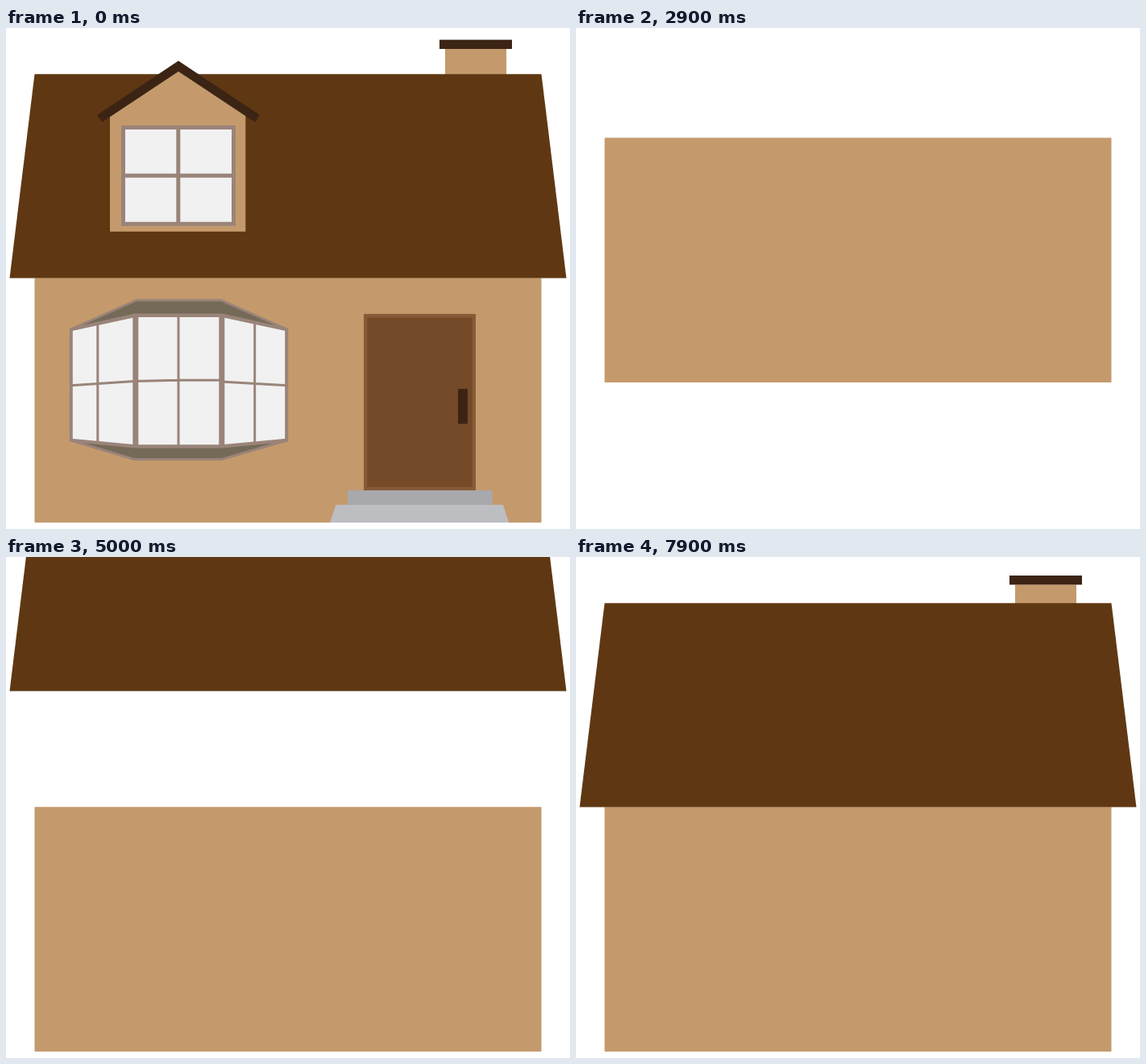
An HTML page for the animation above (8 s loop, 700 by 622 pixels).

```html
<!DOCTYPE html>
<html lang="en">
<head>
<meta charset="utf-8">
<title>House</title>
<style>
  html, body { margin: 0; width: 100%; height: 100%; overflow: hidden; background: #fff; }
  svg { display: block; width: 700px; height: 622px; }
  .tan { fill: #c49a6c; }
  .brown { fill: #5f3813; }
  .dark { fill: #3c2415; }
  .shade { fill: #756a58; stroke: #9a8479; stroke-width: 3; }
  .glass { fill: #f1f1f1; }
  .frame { fill: none; stroke: #9a8479; }
  .ridge { fill: none; stroke: #3c2415; stroke-width: 11; }
  .faded :is(path, rect) { opacity: .25; }
  .faded .trim :is(path, rect) { opacity: .38; }
</style>
</head>
<body>
<svg id="house" viewBox="0 0 700 622">
  <g id="wall">
    <rect class="tan" x="35.5" y="310.3" width="629" height="303.7"/>
  </g>
  <g id="chimney">
    <rect class="tan" x="545" y="26" width="76" height="72.5"/>
    <rect class="dark" x="538" y="14.6" width="90" height="11.4"/>
  </g>
  <g id="roof">
    <path class="brown" d="M35.5 57.2H664.5L695.5 310.5H4.5Z"/>
  </g>
  <g id="details">
    <g class="trim">
      <!-- dormer -->
      <path class="tan" d="M129 252.8V105L214 49L297.3 105V252.8Z"/>
      <path class="ridge" d="M116 112.5L214 47.3L312 112.5"/>
      <rect class="glass" x="145" y="123" width="138" height="120"/>
      <path class="frame" stroke-width="5" d="M145.5 123.5H282.5V243.2H145.5ZM213.8 123.5V243M145.5 183.3H282.5"/>

      <!-- bay window -->
      <path class="shade" d="M80.5 374L162 338H267L348.5 374L268 356H160Z"/>
      <path class="shade" d="M80.5 512L159 535.5H268L348.5 512L268 520H160Z"/>
      <path class="glass" d="M81 374.5L160 357H268L348.5 374.5V511.5L268 520H160L81 511.5Z"/>
      <path class="frame" stroke-width="3" d="M113.8 367V516M214 357V520M308.7 366V516M81 443.7L160 438.5L214 437.3H268M270 439.3L348.5 443.7"/>
      <path class="frame" stroke-width="4" d="M160.5 357L80.8 374.3V511.8L160.5 519.3H268L348.2 511.8V374.3L268 357Z"/>
      <path class="frame" stroke-width="7" d="M160.8 355V521M267.8 355V521"/>

      <!-- steps -->
      <rect fill="#a7a9ac" x="424" y="574" width="179.5" height="29.5"/>
      <path fill="#bcbec2" d="M409.5 592H617L624 614H402Z"/>
    </g>

    <!-- door -->
    <rect fill="#875a38" x="444" y="355" width="139" height="219"/>
    <rect fill="#754a29" x="448.3" y="359.4" width="130.4" height="210.4"/>
    <rect class="dark" x="561" y="448" width="12" height="43.5"/>
  </g>
</svg>
<script>
  const LOOP = 8000, TICK = 200, CLEAR = 1500;
  const house = document.getElementById('house');
  const details = document.getElementById('details');

  // Each part enters at `from`, moving `dy` per tick until it rests at `to`.
  const parts = [
    { id: 'wall', from: 1500, to: 3500, dy: -58 },
    { id: 'roof', from: 4000, to: 6000, dy: -28.8 },
    { id: 'chimney', from: 6500, to: 8300, dy: 4.2 }
  ].map(p => ({ ...p, el: document.getElementById(p.id) }));

  const show = (el, on) => el.setAttribute('visibility', on ? 'visible' : 'hidden');

  function draw(t) {
    const whole = t < CLEAR;
    house.classList.toggle('faded', whole && t >= 1000);
    show(details, whole);
    for (const { el, from, to, dy } of parts) {
      const left = whole ? 0 : Math.max(0, Math.ceil((to - t) / TICK));
      show(el, whole || t >= from);
      el.setAttribute('transform', `translate(0 ${left * dy})`);
    }
  }

  const start = performance.now();
  function loop() {
    draw((performance.now() - start) % LOOP);
    requestAnimationFrame(loop);
  }
  loop();
</script>
</body>
</html>
```
